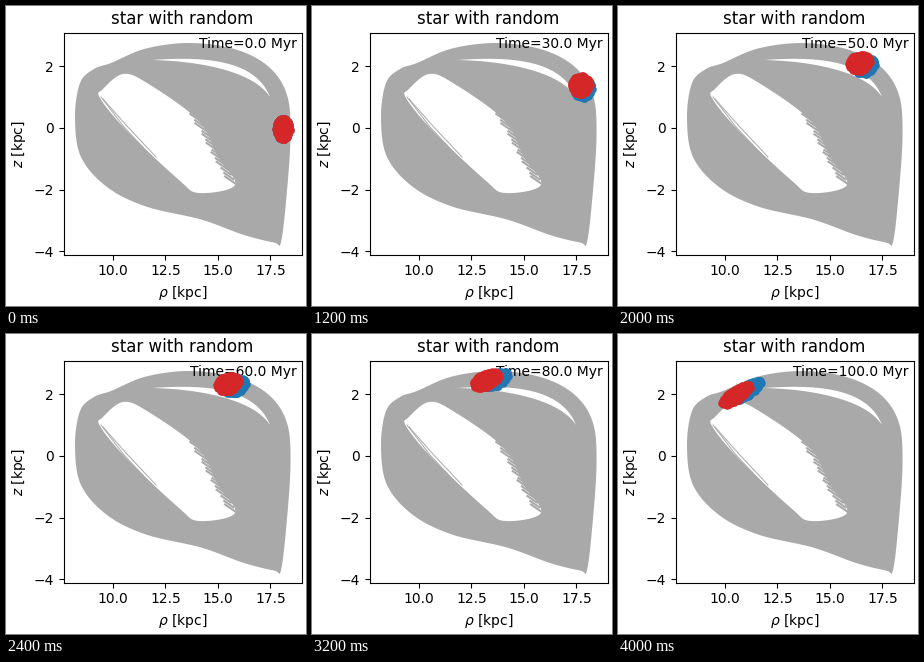
Recreate the animation shown at these times as a matplotlib script. Size 300 px wide and 300 px high, loop 4.2 s.

```python
import numpy as np
import matplotlib.pyplot as plt
from matplotlib.animation import FuncAnimation

SIZE, FRAMES, INTERVAL = 300, 21, 200
LEFT, RIGHT, TOP, BOTTOM = 57.6, 295.6, 26.75, 248.75
GRAY = "darkgray"
rng = np.random.default_rng(4)


def to_data(points):
    """Convert stage pixels (y down) to kpc."""
    x, y = np.asarray(points, float).T
    return np.column_stack([10 + (x - 106.9) / 21, (121.95 - y) / 30.85])


def smooth(points, steps=10):
    """Closed Catmull-Rom curve through the points."""
    p1 = np.asarray(points, float)
    p0, p2, p3 = (np.roll(p1, s, axis=0) for s in (1, -1, -2))
    t = np.linspace(0, 1, steps, endpoint=False)[None, :, None]
    p0, p1, p2, p3 = (p[:, None] for p in (p0, p1, p2, p3))
    curve = 0.5 * (2 * p1 + (p2 - p0) * t
                   + (2 * p0 - 5 * p1 + 4 * p2 - p3) * t**2
                   + (3 * p1 - p0 - 3 * p2 + p3) * t**3)
    return curve.reshape(-1, 2)


def lens(start, control, end, thickness):
    """Quadratic Bezier arc that is thickest in the middle."""
    t = np.linspace(0, 1, 40)[:, None]
    middle = ((1 - t)**2 * np.array(start) + 2 * t * (1 - t) * np.array(control)
              + t**2 * np.array(end))
    offset = thickness / 2 * np.sin(np.pi * t) * np.array([-0.5, 0.87])
    return np.vstack([middle + offset, (middle - offset)[::-1]])


def fill(points, color):
    ax.fill(*to_data(points).T, color=color, lw=0, zorder=2)


def strand(points, width):
    ax.plot(*to_data(points).T, color=GRAY, lw=width, zorder=2)


fig = plt.figure(figsize=(3, 3), dpi=100)
ax = fig.add_axes([LEFT / SIZE, 1 - BOTTOM / SIZE,
                   (RIGHT - LEFT) / SIZE, (BOTTOM - TOP) / SIZE])
(x0, y0), (x1, y1) = to_data([(LEFT, BOTTOM), (RIGHT, TOP)])
ax.set(xlim=(x0, x1), ylim=(y0, y1), title="star with random",
       xlabel=r"$\rho$ [kpc]", ylabel=r"$z$ [kpc]",
       xticks=np.arange(10, 18, 2.5), yticks=range(-4, 3, 2))

# Region swept by the orbits, with the gaps they leave
outline = [(69, 112), (74, 77), (88, 63), (105, 57), (140, 42.5), (185, 37),
           (230, 43.5), (263, 61), (281, 89), (284.5, 130), (280.5, 190),
           (275, 236), (268, 236.5), (238, 229), (195, 213.5), (140, 200.5),
           (101, 181), (75, 151)]
cavity = [(117, 68), (97, 83), (94, 92), (121, 125), (173, 174), (193, 187),
          (229, 179), (212, 151), (192, 114), (141, 77)]
fill(smooth(outline), GRAY)
fill(smooth(cavity), "white")
fill(lens((146, 54), (244, 51.5), (264, 91), 7), "white")

# Loose strands along both sides of the cavity
for s in np.linspace(0, 1, 14):
    x, y, reach = 190 + 34 * s, 112 + 62 * s, rng.uniform(1, 6)
    strand([(x - reach, y - 0.7 * reach), (x + 6, y + 4)], 1.5)
for s in (0, 2):
    strand([(95 + s, 91 + s), (118 + s, 121 - s), (148 + s, 153 - s)], 0.7)

# Star cloud: points in a unit disc, sheared along the orbit as it ages
COUNT = 110
angle = rng.uniform(0, 2 * np.pi, COUNT)
radius = np.sqrt(rng.uniform(0, 1, COUNT))
u, v = radius * np.cos(angle), radius * np.sin(angle)


def orbit(t):
    """Centre of the cloud in stage pixels."""
    s = t - 14.9
    return (278.7 - 200 * (1 - np.cos(0.0753 * (t - 1.75))),
            45.6 + s**2 * (0.535 + 0.0125 * s))


def cloud(frame, lag=0):
    cx, cy = orbit(frame - lag)
    width, height = 6.8 + 0.38 * frame, 10.5 - 0.22 * frame
    shear = -8 * (frame / 20)**3
    return to_data(np.column_stack([cx + width * u,
                                    cy + shear * u + height * v]))


blue = ax.scatter([], [], s=26, color="tab:blue", zorder=10)
red = ax.scatter([], [], s=26, color="tab:red", zorder=11)
label = ax.text(0.98, 0.98, "", ha="right", va="top", transform=ax.transAxes)


def update(frame):
    blue.set_offsets(cloud(frame, lag=0.35 * frame**0.25))
    red.set_offsets(cloud(frame))
    label.set_text(f"Time={5 * frame:.1f} Myr")
    return blue, red, label


anim = FuncAnimation(fig, update, frames=FRAMES, interval=INTERVAL,
                     repeat=True, repeat_delay=0)
plt.show()
```
